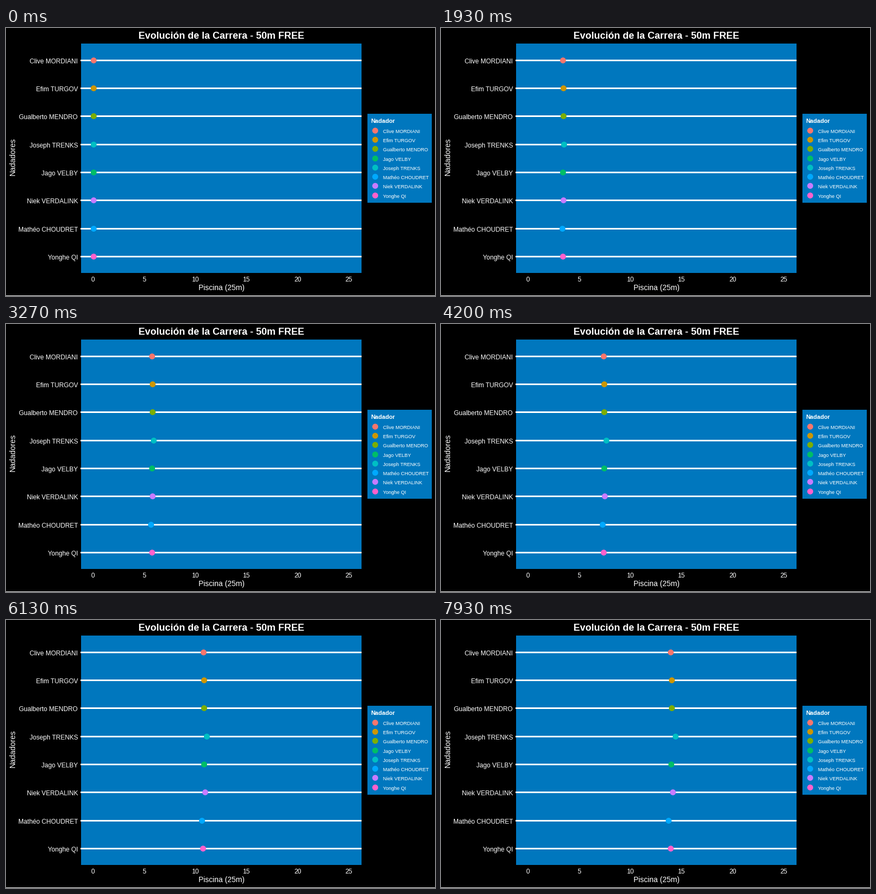
Animation, 800 px wide and 500 px high, one loop 8 s. Source, as a matplotlib script:

```python
import math

import matplotlib.pyplot as plt
from matplotlib.animation import FuncAnimation
from matplotlib.patches import Circle, Rectangle

W, H, DPI = 800, 500, 100
TICK_MS, LOOP_MS = 20, 8000
STEPS_PER_S = 15
WATER = "#0077BE"
START_X = 163
DOT_R = 5.5

# lane order from top: name, colour, speed in px per step
SWIMMERS = [
    ("Clive MORDIANI", "#F8766D", 2.229),
    ("Efim TURGOV", "#CD9600", 2.247),
    ("Gualberto MENDRO", "#7CAE00", 2.247),
    ("Joseph TRENKS", "#00BFC4", 2.303),
    ("Jago VELBY", "#00BE67", 2.240),
    ("Niek VERDALINK", "#C77CFF", 2.263),
    ("Mathéo CHOUDRET", "#00A9FF", 2.198),
    ("Yonghe QI", "#FF61CC", 2.228),
]

plt.rcParams["font.family"] = "Liberation Sans"
fig = plt.figure(figsize=(W / DPI, H / DPI), dpi=DPI, facecolor="black")
ax = fig.add_axes([0, 0, 1, 1])
ax.set_xlim(0, W)
ax.set_ylim(H, 0)
ax.axis("off")


def box(x, y, w, h, color):
    ax.add_patch(Rectangle((x, y), w, h, fc=color, lw=0, antialiased=False))


def label(x, y, text, px, ha="center", **kw):
    ax.text(x, y, text, fontsize=px * 72 / DPI, color="white",
            ha=ha, va="baseline", **kw)


def dot(x, y, color):
    """Round dot centred on the pixel (x, y)."""
    return ax.add_patch(Circle((x + 0.5, y + 0.5), DOT_R, fc=color, lw=0,
                               zorder=3))


# Pool and lanes
box(140, 29, 523, 428, WATER)
dots = []
for i, (name, color, _) in enumerate(SWIMMERS):
    y = math.floor(60.35 + 52.286 * i)
    box(139, y - 1, 524, 3, "white")
    label(134, y + 6, name, 12, ha="right")
    dots.append(dot(START_X, y, color))

# Title, axes and bottom edge
label(401.5, 20, "Evolución de la Carrera - 50m FREE", 18.15, weight="bold")
for k in range(6):
    label(162.3 + 95.35 * k, 473, str(5 * k), 12)
label(401.5, 489, "Piscina (25m)", 14)
label(17, 240, "Nadadores", 14.2, rotation=90, rotation_mode="anchor")
box(0, 499, W, 1, "white")

# Legend, sorted by name
box(674, 160, 120, 166, WATER)
label(680, 177, "Nadador", 11, ha="left", weight="bold")
for i, (name, color, _) in enumerate(sorted(SWIMMERS)):
    y = math.floor(191.2 + 17.28 * i)
    dot(688, y, color)
    label(703, y + 5, name, 9.3, ha="left")


def update(tick):
    # dots advance in whole steps; the offset centres steps on the tick grid
    step = (tick * TICK_MS + 15) * STEPS_PER_S // 1000
    for d, (_, _, speed) in zip(dots, SWIMMERS):
        d.center = (math.floor(START_X + speed * step) + 0.5, d.center[1])
    return dots


anim = FuncAnimation(fig, update, frames=LOOP_MS // TICK_MS, interval=TICK_MS,
                     repeat=True, repeat_delay=0, blit=False)
plt.show()
```
